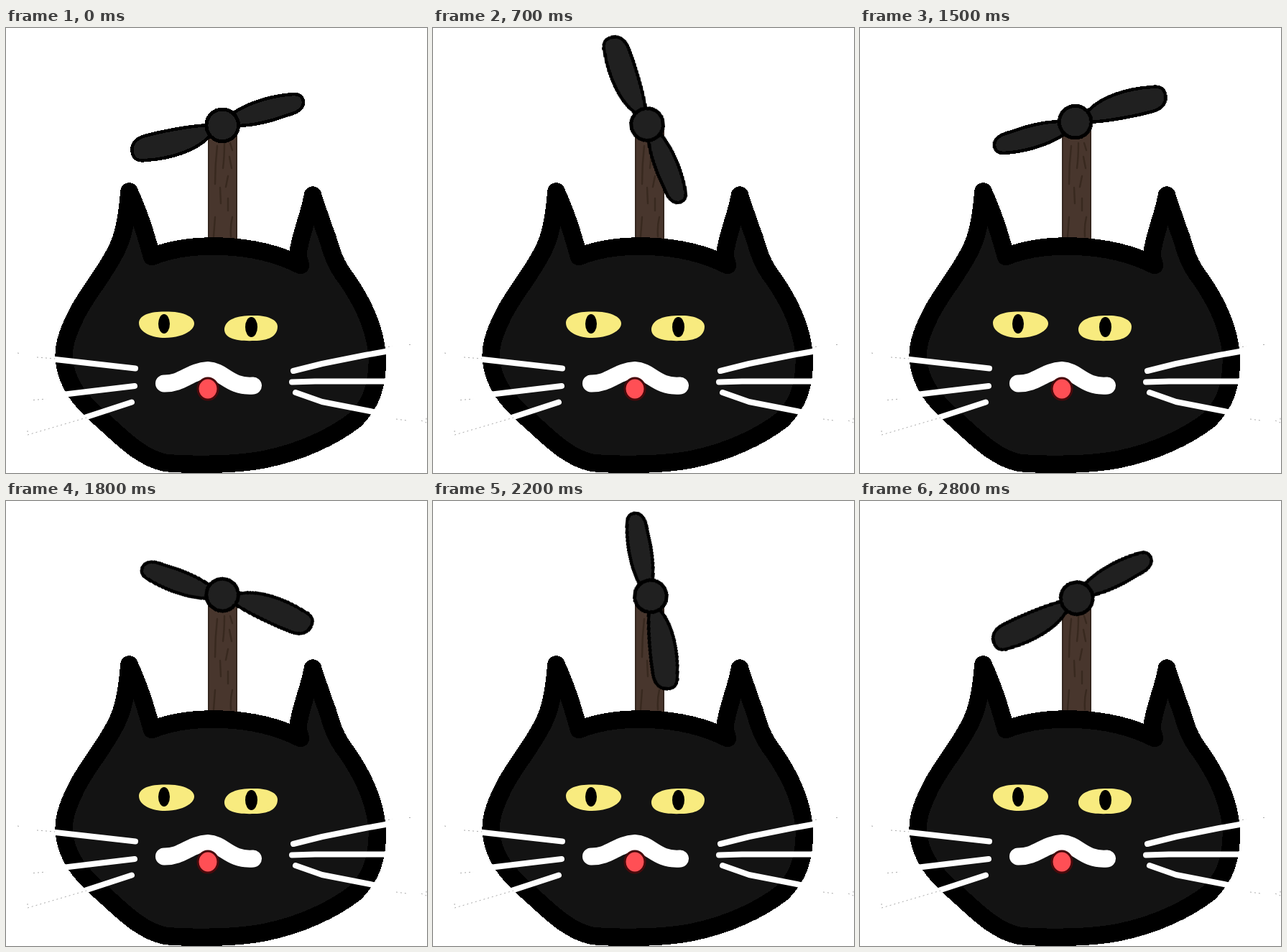
An HTML page for the animation above (2900 ms loop, 586 by 619 pixels).

```html
<!DOCTYPE html>
<html lang="en">
<head>
<meta charset="utf-8">
<title>Propeller cat</title>
<style>
  html, body { margin: 0; width: 100%; height: 100%; overflow: hidden; background: #fff; }
  svg { display: block; width: 100vw; height: 100vh; }
  path { stroke-linecap: round; stroke-linejoin: round; }

  .line { fill: none; }
  .head { fill: #131313; stroke: #000; stroke-width: 24.5; shape-rendering: crispEdges; }
  .grain { stroke: #38291f; stroke-width: 2.4; }
  .eye { fill: #f8eb7f; }
  .whisker { stroke: #fff; stroke-width: 8; }
  .specks { stroke: #aaa; stroke-width: 1; stroke-dasharray: 2 4; stroke-linecap: butt; }

  .propeller {
    fill: #202020;
    stroke: #000;
    stroke-width: 4.5;
    shape-rendering: crispEdges;
    transform-origin: 300.4px 133px;
    animation: spin 2.9s infinite;
  }
  /* 12 degrees every 100 ms, with one double step on the way */
  @keyframes spin {
    0% { transform: rotate(0deg); animation-timing-function: steps(20, end); }
    68.96% { transform: rotate(240deg); animation-timing-function: step-start; }
    68.962% { transform: rotate(252deg); animation-timing-function: steps(9, end); }
    100% { transform: rotate(360deg); }
  }
</style>
</head>
<body>
<svg viewBox="0 0 586 619" preserveAspectRatio="none">
  <g class="pole">
    <rect x="281" y="138" width="41" height="166" fill="#48362d"/>
    <path class="line" d="M282 139V300M321 139V300" stroke="#35271f" stroke-width="2"/>
    <path class="line grain" d="M294 164Q291 190 291 217M304 160Q304 180 302 195M312 160L315 170
      M311 179L314 195M309 206L306 221M298 222L299 244M309 237V254M291 263L289 290M315 263Q312 275 313 290"/>
  </g>

  <path class="head" d="M203 318C195 288 184 254 171.500 227.500C169 258 165 285 156 304
    C141 338 114 367 98 399C84 427 79 445 81 463C85 496 104 519 129 541
    C159 567 185 597 222 605C260 608 320 608 360 600C410 590 455 569 486 545
    C508 523 517 498 517 460C515 420 497 382 474 349C452 321 452 300 443 280
    C437 262 431 246 427 232.500C422 262 410 285 406 316L410 330C345 297 255 297 203 318Z"/>

  <g class="eyes">
    <path class="eye" d="M185 410C186 398 203 394 224 394.500C246 394 262 402 262 411
      C262 422 243 431 221 431C204 431 185 424 185 410Z"/>
    <path class="eye" d="M304 418C306 405 322 400 343 400C364 399 378 406 378 415
      C378 429 365 435 346 435C321 436 303 432 304 418Z"/>
    <ellipse cx="220" cy="411.500" rx="8" ry="13.500"/>
    <ellipse cx="341.500" cy="416" rx="8.500" ry="14"/>
  </g>

  <path class="line whisker" d="M180 473.500L60 460M179 498L70 511M175 520.500L100 545
    M400 477L440 467L500 455L545 447M398 492.500L430 491.500H540M403 507L440 520L525 536.500"/>
  <path class="line specks" d="M16 452L20 453M43 458L68 460M38 517.500L56 516M30 560V566L112 542
    M532 443.500L538 442.500M561 440.500H566M543 544L558 546M578 546L585 549V541"/>

  <path class="line" d="M220 494.500C246 495 256 477 281 476C303 477 311 500 344 497.500"
    stroke="#fff" stroke-width="24"/>
  <ellipse cx="281" cy="502" rx="14" ry="15" fill="#ff4f55" stroke="#480a0c" stroke-width="3"/>

  <g class="propeller">
    <path d="M284 135C255 136 215 144 192 150.500C178 155 174 164 176 174C178 183 184 185.500 194 184
      C230 182 266 170 284 150Z"/>
    <path d="M318 117C340 103 372 93.500 401 92C410 92 414 97 414 104C413 114 404 118 391 121.500
      C368 130 342 136 320 136Z"/>
    <circle cx="301.200" cy="135.400" r="22.300" stroke-width="5"/>
  </g>
</svg>
</body>
</html>
```
